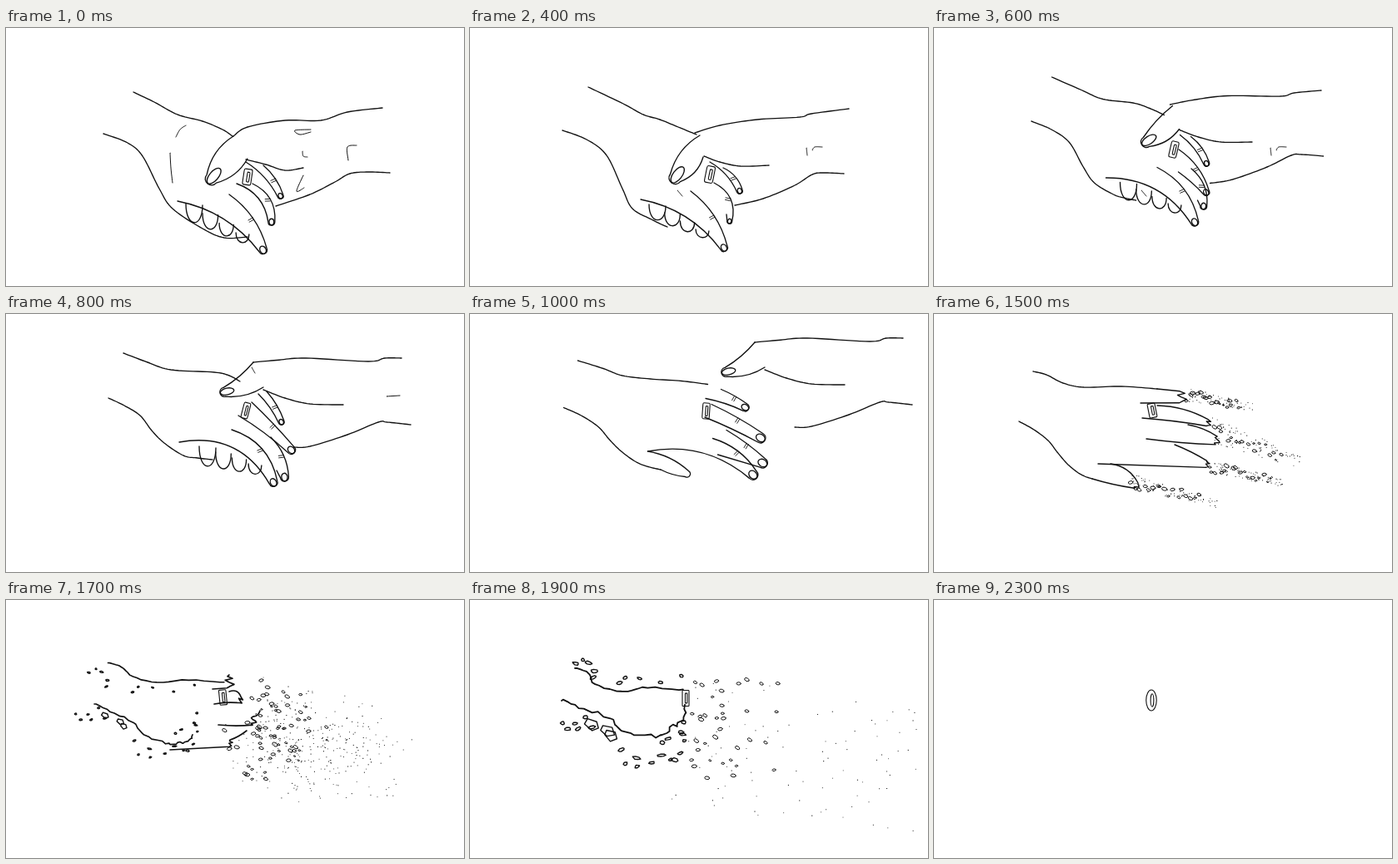
These frames come from a looping animation (550x310 px, 2400 ms). An HTML page with a canvas:

```html
<!DOCTYPE html>
<html lang="en">
<head>
<meta charset="utf-8">
<title>Letting go</title>
<style>
html, body { margin: 0; width: 550px; height: 310px; overflow: hidden; background: #fff; }
canvas { display: block; }
</style>
</head>
<body>
<canvas id="stage" width="550" height="310"></canvas>
<script>
const ctx = document.getElementById('stage').getContext('2d');
const LOOP = 2400, STEP = 100;
const mix = (a, b, k) => a + (b - a) * k;
const clamp = v => Math.min(1, Math.max(0, v));
const progress = (t, from, to) => clamp((t - from) / (to - from));

let seed = 11;
function rand(lo = 0, hi = 1) {
  seed = (seed * 16807) % 2147483647;
  return mix(lo, hi, seed / 2147483647);
}
const noise = Array.from({ length: 97 }, () => rand(-1, 1));

// A track holds poses by time; in-between poses are mixed number by number.
const parts = [];
function track(draw, from, to, poses, opt = {}) {
  const times = Object.keys(poses).map(Number);
  const values = Object.values(poses).map(s => s.split(/[ ,]+/).map(Number));
  parts.push({ draw, from, to, times, values, ...opt });
}
function poseAt({ times, values }, t) {
  const j = times.findIndex(k => k > t);
  if (j < 0) return values[values.length - 1];
  if (j === 0) return values[0];
  const k = progress(t, times[j - 1], times[j]);
  return values[j].map((v, n) => mix(values[j - 1][n], v, k));
}

// Smooth curve through x,y pairs; rough > 0 makes it crumble.
function trace(nums, rough) {
  const at = i => {
    const n = 2 * Math.min(nums.length / 2 - 1, Math.max(0, i));
    return [nums[n], nums[n + 1]];
  };
  const per = rough ? 5 : 10, points = [at(0)];
  for (let i = 0; i < nums.length / 2 - 1; i++) {
    const [a, b, c, d] = [at(i - 1), at(i), at(i + 1), at(i + 2)];
    for (let s = 1; s <= per; s++) {
      const u = s / per, id = i * per + s;
      points.push([0, 1].map(n => 0.5 * (2 * b[n] + (c[n] - a[n]) * u
        + (2 * a[n] - 5 * b[n] + 4 * c[n] - d[n]) * u * u
        + (3 * b[n] - a[n] - 3 * c[n] + d[n]) * u * u * u) + rough * noise[(id * 2 + n) % 97]));
    }
  }
  return points;
}
function path(points) {
  ctx.beginPath();
  points.forEach(p => ctx.lineTo(...p));
  ctx.stroke();
}
const curve = (nums, t, { crumble = 0 }) => path(trace(nums, crumble * progress(t, 1500, 1900)));

function oval(x, y, rx, ry, tilt = 0) {
  ctx.beginPath();
  ctx.ellipse(x, y, rx, ry, tilt, 0, 7);
  ctx.stroke();
}

// Control point that bows a line sideways by b.
function bow(x0, y0, x1, y1, b) {
  const len = Math.hypot(x1 - x0, y1 - y0) || 1;
  return [(x0 + x1) / 2 + 2 * b * (y1 - y0) / len, (y0 + y1) / 2 - 2 * b * (x1 - x0) / len];
}

// Pose: root A, tip, root B, bow of each edge, tip radius.
function finger([ax, ay, x, y, bx, by, p, q, r], t, { nail = 1, ticks = true }) {
  const gone = progress(t, 1500, 1800);
  x = mix(x, (ax + bx) / 2, gone);
  y = mix(y, (ay + by) / 2, gone);
  const c = bow(ax, ay, x, y, p), e = bow(bx, by, x, y, q);
  const dir = Math.atan2(y - (c[1] + e[1]) / 2, x - (c[0] + e[0]) / 2);
  const dx = Math.cos(dir), dy = Math.sin(dir);
  const at = (along, side) => [x + (dx * along + dy * side) * r, y + (dy * along - dx * side) * r];
  const s1 = at(-1, 1), s2 = at(-1, -1), edge = bow(ax, ay, ...s1, p);

  ctx.beginPath();
  ctx.moveTo(ax, ay);
  ctx.quadraticCurveTo(...edge, ...s1);
  if (t > 1300)
    for (let i = 1; i < 6; i++) ctx.lineTo(...at(-0.5 + noise[i + Math.round(ax) % 40] * 0.9, 1 - i / 3));
  else ctx.bezierCurveTo(...at(0.33, 1), ...at(0.33, -1), ...s2);
  ctx.lineTo(...s2);
  ctx.quadraticCurveTo(...bow(bx, by, ...s2, q), bx, by);
  ctx.stroke();
  if (t > 1300) return;
  if (nail) oval(...at(-nail, 0), r * nail * 0.95, r * 0.72, dir);
  if (nail && ticks) {
    const mx = (ax + s1[0]) / 4 + edge[0] / 2, my = (ay + s1[1]) / 4 + edge[1] / 2;
    ctx.lineWidth = 0.9;
    for (const s of [0, 2.5])
      path([[mx + dx * s, my + dy * s], [mx + dx * s - dy * 6, my + dy * s + dx * 6]]);
  }
}

// Row of curled fingertips below the palm.
function curled([x0, y0, x1, y1, depth]) {
  for (let i = 0; i < 4; i++) {
    const x = mix(x0, x1, i / 3), y = mix(y0, y1, i / 3), h = depth * (1.05 - i * 0.17), w = 10 - i * 0.7;
    ctx.beginPath();
    ctx.moveTo(x - w, y);
    ctx.bezierCurveTo(x - w, y + h * 1.3, x + w, y + h * 1.3, x + w, y + 2);
    ctx.stroke();
  }
}

// Pose: centre, width, height, tilt, roundness.
function band([x, y, w, h, tilt, round]) {
  ctx.save();
  ctx.translate(x, y);
  ctx.rotate(tilt);
  ctx.lineWidth = 1.1;
  const rim = (dx, w, h) => {
    ctx.beginPath();
    ctx.roundRect(dx - w / 2, -h / 2, w, h, { x: w / 2 * round, y: h / 2 * round });
    ctx.stroke();
  };
  rim(0, w, h);
  rim(w * 0.08, w * 0.3, h * 0.62);
  ctx.restore();
}

const grip = { move: t => [45 * progress(t, 800, 1000), -24 * progress(t, 800, 1000)] };
const open = { w: 1.7, nail: 0, move: t => [(t - 1200) / 100 * 10, t < 1200 ? -12 : 0] };
const worn = { worn: true }, crumbling = { worn: true, crumble: 2.6 };

// Left arm
track(curve, 0, 2100, {
  0: '153,77 178,89 206,104 236,112 260,122 272,130',
  400: '142,71 184,91 208,104 228,110 250,119 272,128',
  800: '141,47 170,58 198,67 250,70 268,74 281,81',
  1200: '118,65 150,73 168,81 183,86 240,87 290,88',
  1500: '119,69 135,73 155,83 180,88 225,87 268,90',
  1900: '126,82 143,88 150,101 183,110 213,105 256,108'
}, { worn: true, crumble: 1 });
track(curve, 0, 2100, {
  0: '117,127 146,138 164,154 184,193 200,217 236,241 262,252 290,251',
  400: '111,123 140,134 164,153 183,193 195,217 218,230 230,236 237,239',
  800: '123,101 142,110 161,122 175,140 190,155 213,170 230,173 248,175',
  1200: '102,124 125,134 147,149 160,162 172,174 185,185 198,194 210,199',
  1500: '102,129 120,139 137,152 148,166 160,180 172,190 181,195 190,198',
  1900: '110,121 132,129 168,142 185,158 222,164 240,154 254,144 258,127'
}, crumbling);

// Left fingers: index, middle, ring, little, thumb
track(finger, 0, 1700, {
  0: '268,200 311,271 206,208 7 11 5',
  400: '265,196 307,268 205,206 7 11 4.5',
  800: '271,139 323,207 208,154 12 21 5',
  1200: '312,160 365,188 219,176 0 9 7',
  1500: '289,157 331,181 197,180 1 0 4'
}, worn);
track(finger, 500, 1700, {
  400: '300,190 312,235 308,226 8 0 3',
  800: '318,148 335,201 325,188 5 0 5',
  1200: '298,131 378,163 270,150 -2 0 7',
  1500: '305,133 344,153 255,150 2 -1 5'
}, worn);
track(finger, 0, 1700, {
  0: '296,187 319,237 277,187 9 9 4',
  400: '293,186 311,235 308,224 10 0 3',
  800: '295,106 346,167 279,122 1 2 5',
  1200: '285,111 362,137 285,126 2 0 7',
  1500: '268,110 332,132 250,125 4 1 4'
}, worn);
track(finger, 0, 1700, {
  0: '309,165 331,205 288,161 3 4 3.5',
  400: '304,168 325,199 288,161 4 4 3.5',
  800: '313,93 332,133 303,96 2 2 3.5',
  1200: '290,88 337,96 263,107 0 1 6',
  1500: '268,90 302,100 248,107 0 0 7'
}, worn);
track(finger, 900, 1600, {
  800: '208,154 255,177 248,175 4 -1 4',
  1200: '219,176 273,211 210,199 4 -2 4',
  1500: '212,180 246,208 190,198 5 -1 4'
}, { worn: true, nail: 0 });

// Right hand, holding
track(curve, 0, 1000, {
  0: '273,130 290,119 335,111 378,111 410,101 452,96',
  400: '270,126 300,117 345,110 396,107 410,103 455,97',
  800: '297,58 325,55.5 360,53 435,57 455,53 475,53'
}, grip);
track(curve, 0, 1000, {
  0: '288,158 312,164 335,171 357,168',
  400: '281,154 300,161 325,166 359,165',
  800: '309,91 335,101 365,108 405,109'
}, grip);
track(curve, 0, 1000, {
  0: '324,214 365,200 395,185 413,175 435,173 461,174',
  400: '318,213 352,205 390,189 411,176 425,174 449,175',
  800: '345,160 365,159 410,145 447,130 458,130 486,133'
}, grip);
track(finger, 0, 1000, {
  0: '290,157 242,187 273,130 5 -6 7.5',
  400: '280,155 242,186 276,129 5 -6 7.5',
  800: '309,88 257,95 297,58 4 2 5.5'
}, { ...grip, nail: 1.6, ticks: false });
track(curled, 0, 900, {
  0: '226,211 284,246 22',
  400: '225,212 279,242 18',
  800: '242,159 299,180 23'
}, grip);

// Right hand, released
['490,131 396,160 536,82 -13 -14 6', '479,150 408,202 441,138 -8 -6 8',
 '498,163 453,223 474,151 -8 -5 8', '521,179 482,237 498,165 -3 0 8']
  .forEach(s => track(finger, 1100, 1300, { 1200: s }, open));
track(([x, y]) => oval(x, y, 14, 6, 0.1), 1100, 1300, { 1200: '500,101' }, open);
track(curve, 1100, 1300, { 1200: '490,108 508,118 529,113' }, open);

// Skin creases
const creases = (from, to, list, opt) =>
  list.forEach(s => track(curve, from, to, { [from]: s }, { w: 1, ...opt }));
creases(0, 200, ['216,117 209,122 204,131', '197,150 198,168 200,186', '366,122 347,123 353,128 366,125',
  '356,148 357,154 362,155', '357,177 349,196 358,192', '421,141 410,143 411,159']);
creases(300, 600, ['404,144 405,153', '411,147 414,143 423,143', '249,195 255,202']);
creases(700, 900, ['457,99 473,98', '295,64 299,71'], grip);

track(band, 0, 2300, {
  0: '290,179 10 19 .15 .3',
  400: '288,176 10 20 .2 .3',
  800: '288,116 8 19 .25 .3',
  1200: '279,117 9 19 -.12 .2',
  1500: '262,116 9 17 -.2 .2',
  1900: '259,118 8 19 0 .1',
  2300: '261,120.5 12.5 25 0 1'
});

// Dust leaves each fingertip along a trail, then fans out to the right.
const dust = [];
[[302, 96, 383, 112, 9], [334, 138, 440, 178, 16], [328, 182, 425, 204, 8], [236, 200, 340, 228, 9]]
  .forEach(([x0, y0, x1, y1, wide]) => {
    for (let i = 0; i < 95; i++) {
      const big = i < 17, u = big ? (i + rand()) / 21 : rand() ** 1.2;
      const far = rand(), fall = rand();
      const y = big ? rand(95, 215) : mix(mix(85, 130, far), mix(250, 280, far), fall);
      dust.push({
        big, tilt: rand(-0.3, 0.6), lasts: big ? i < 9 : i < 40,
        r: big ? rand(1.6, 3.2) - u : rand(0.4, 0.55),
        tip: [x0, y0],
        trail: [mix(x0, x1, u), mix(y0, y1, u) + rand(-wide, wide) * (1 - u * 0.5)],
        fan: [big ? 266 + 105 * far ** 1.5 : mix(262 - Math.max(0, y - 190) * 0.5, 547, far), y]
      });
    }
  });

function drawDust(t) {
  if (t < 1300 || t > 2200) return;
  const out = progress(t, 1200, 1500), k = Math.max(0, (t - 1500) / 400), fade = progress(t, 2300, 1900);
  ctx.lineWidth = 1;
  for (const d of dust) {
    if (t > 1700 && !d.lasts) continue;
    const [x, y] = [0, 1].map(n => mix(mix(d.tip[n], d.trail[n], out), d.fan[n], k));
    const r = d.r * fade;
    if (d.big) oval(x, y, r * 1.15, r * 0.7, d.tilt);
    else ctx.fillRect(x, y, r * 2, r * 2);
  }
}

// Flakes break off both edges of the arm; the first few below it are large shards.
const flakes = [];
parts.slice(0, 2).forEach((arm, below) => {
  const edge = trace(arm.values[arm.values.length - 1], 0), count = below ? 24 : 10;
  for (let i = 0; i < count; i++) {
    const [x, y] = edge[Math.floor((i + rand()) / count * (edge.length - 1))];
    const shard = below && i > 5 && i < 9;
    flakes.push({
      x: x + rand(-4, 4) - (shard ? 10 : 0), side: below ? 1 : -1,
      y: y + (shard ? 12 : below ? rand(8, 42) : -rand(4, 17)),
      rx: shard ? 10 : rand(1.8, 4.8), ry: shard ? 6 : rand(1.3, 2.2),
      tilt: shard ? 0.5 : rand(-0.5, 0.3), corners: shard ? 5 : 7, id: i
    });
  }
});

function drawFlakes(t) {
  if (t < 1700 || t > 2200) return;
  const k = (t - 1900) / 400, size = 1 - Math.abs(k);
  ctx.lineWidth = 1.4;
  for (const f of flakes) {
    ctx.save();
    ctx.translate(f.x + k * 55, f.y + f.side * k * 22);
    ctx.rotate(f.tilt);
    ctx.beginPath();
    for (let c = 0; c < f.corners; c++) {
      const a = c / f.corners * 2 * Math.PI, r = size * (1 + noise[f.id * 3 + c] * 0.25);
      ctx.lineTo(Math.cos(a) * f.rx * r, Math.sin(a) * f.ry * r);
    }
    ctx.closePath();
    ctx.stroke();
    ctx.restore();
  }
}

function drawPart(part, t) {
  if (t < part.from || t > part.to) return;
  ctx.save();
  ctx.lineWidth = part.w || mix(1.35, 1.8, progress(t, 1500, 1800));
  if (part.move) ctx.translate(...part.move(t));
  if (part.worn && t > 1500) {
    const front = t < 1900 ? mix(350, 268, progress(t, 1500, 1900)) : mix(268, 90, progress(t, 1900, 2200));
    ctx.beginPath();
    ctx.rect(0, 0, front, 310);
    ctx.clip();
  }
  part.draw(poseAt(part, t), t, part);
  ctx.restore();
}

function draw(t) {
  ctx.fillStyle = '#fff';
  ctx.fillRect(0, 0, 550, 310);
  ctx.fillStyle = ctx.strokeStyle = '#111';
  ctx.lineCap = ctx.lineJoin = 'round';
  parts.forEach(p => drawPart(p, t));
  drawDust(t);
  drawFlakes(t);
}

const start = performance.now();
function tick() {
  const t = (performance.now() - start) % LOOP;
  draw(Math.floor(t / STEP) * STEP);
  requestAnimationFrame(tick);
}
tick();
</script>
</body>
</html>
```
